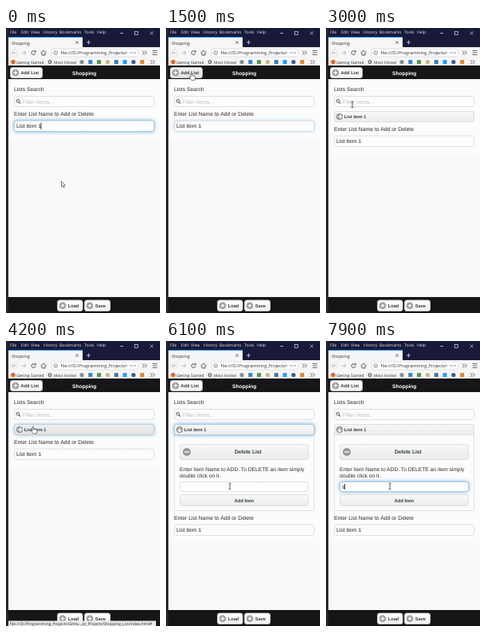
Recreate the animation shown at these times as an HTML page with a canvas. Size 193 by 357 pixels, loop 8000 ms.

```html
<!DOCTYPE html>
<html lang="en">
<head>
<meta charset="utf-8">
<title>Shopping</title>
<style>
html, body { margin: 0; width: 100%; height: 100%; overflow: hidden; background: #f9f8fa; }
canvas { display: block; width: 193px; height: 357px; }
</style>
</head>
<body>
<canvas id="stage" width="193" height="357"></canvas>
<script>
const LOOP = 8000, STEP = 100;
const ctx = document.getElementById('stage').getContext('2d');
ctx.textRendering = 'geometricPrecision';

const PAGE = '"Liberation Sans", Arial, sans-serif';
const CHROME = '"Open Sans", sans-serif';
const BAR = '#161618', CONTENT = '#fcfcfd', BACKDROP = '#f9f8fa';

// Pointer path: time, x, y, shape
const path = [
  [0, 69.5, 192, 'arrow'], [100, 74, 204, 'arrow'], [300, 106, 262, 'arrow'], [400, 111, 272, 'arrow'],
  [600, 88, 208, 'arrow'], [800, 58, 122, 'beam'], [900, 48.5, 90, 'beam'], [1000, 44, 78, 'arrow'],
  [1300, 32, 55, 'hand'], [1600, 30, 57, 'hand'], [2500, 30, 57, 'hand'], [2700, 31, 68, 'arrow'],
  [2900, 33, 88, 'beam'], [3100, 33, 104, 'hand'], [3300, 33, 107, 'hand'], [5100, 33, 107, 'hand'],
  [5300, 58, 121, 'arrow'], [5400, 76, 129, 'hand'], [5500, 86, 133, 'hand'], [5600, 92, 116, 'hand'],
  [5800, 101, 56, 'arrow'], [6000, 98, 138, 'arrow'], [6100, 80, 182, 'beam']
];

const between = (t, a, b) => t >= a && t < b;
const ramp = (t, a, b) => Math.max(0, Math.min(1, (t - a) / (b - a)));

function rect(x, y, w, h, fill) {
  ctx.fillStyle = fill;
  ctx.fillRect(x, y, w, h);
}

function text(str, x, y, size = 6.85, { color = '#2a2a2a', bold = false, align = 'left', font = PAGE } = {}) {
  ctx.font = `${bold ? 'bold ' : ''}${size}px ${font}`;
  ctx.textAlign = align;
  ctx.fillStyle = color;
  ctx.fillText(str, x, y);
}

function line(color, width, ...points) {
  ctx.beginPath();
  points.forEach(([x, y]) => ctx.lineTo(x, y));
  ctx.strokeStyle = color;
  ctx.lineWidth = width;
  ctx.stroke();
}

function disc(x, y, r, fill) {
  ctx.beginPath();
  ctx.arc(x, y, r, 0, 7);
  ctx.fillStyle = fill;
  ctx.fill();
}

function ring(x, y, r, color, width = 0.8, start = 0, end = 7) {
  ctx.beginPath();
  ctx.arc(x, y, r, start, end);
  ctx.strokeStyle = color;
  ctx.lineWidth = width;
  ctx.stroke();
}

function box(x, y, w, h, top, bottom = top, glow = 0, border = '#d8d8d8') {
  const shade = ctx.createLinearGradient(0, y, 0, y + h);
  shade.addColorStop(0, top);
  shade.addColorStop(1, bottom);
  ctx.save();
  ctx.beginPath();
  ctx.roundRect(x + 0.5, y + 0.5, w - 1, h - 1, 2.5);
  ctx.shadowColor = `rgba(51,136,204,${glow * 0.85})`;
  ctx.shadowBlur = glow ? 5 : 0;
  ctx.fillStyle = shade;
  ctx.fill();
  ctx.restore();
  ctx.strokeStyle = border;
  ctx.lineWidth = 0.8;
  ctx.stroke();
  if (glow) {
    ctx.strokeStyle = `rgba(110,180,225,${glow * 0.5})`;
    ctx.stroke();
  }
}

function icon(kind, x, y, r = 4.3) {
  disc(x, y, r, '#999');
  const s = r * 0.58, put = (...pts) => line('#fff', 1.3, ...pts.map(([a, b]) => [x + a * s, y + b * s]));
  if (kind !== 'down') put([-1, 0], [1, 0]);
  if (kind === 'plus' || kind === 'down') put([0, -1], [0, 1]);
  if (kind === 'right') put([0.1, -0.9], [1, 0], [0.1, 0.9]);
  if (kind === 'down') put([-0.9, 0.1], [0, 1], [0.9, 0.1]);
}

function button(x, y, w, h, label, { hover = false, glow = 0, kind, labelX, size = 5.7, light = false } = {}) {
  const [top, bottom] = hover ? ['#f0f0f0', '#e1e1e1'] : light ? ['#fff', '#f1f1f1'] : ['#f7f7f7', '#ececec'];
  box(x, y, w, h, top, bottom, glow);
  if (kind) icon(kind, x + (h > 17 ? 9 : 7), y + h / 2, h > 17 ? 5 : 4.3);
  const centered = labelX === undefined;
  text(label, centered ? x + w / 2 : labelX, y + h / 2 + size * 0.36, size,
    { bold: true, align: centered ? 'center' : 'left', color: '#2f3e46' });
}

function browser() {
  rect(0, 0, 193, 24, '#191a3a');
  const white = { color: '#e6e6ee', font: CHROME };
  [['File', 5], ['Edit', 19], ['View', 31], ['History', 47], ['Bookmarks', 67], ['Tools', 98], ['Help', 114]]
    .forEach(([label, x]) => text(label, x, 7.2, 5.2, white));
  line('#ddd', 0.7, [143, 6.5], [147, 6.5]);
  ctx.strokeRect(161.2, 4.5, 4, 4);
  line('#ddd', 0.7, [180.5, 4.5], [184.5, 8.5]);
  line('#ddd', 0.7, [184.5, 4.5], [180.5, 8.5]);

  rect(3, 12, 93, 12, '#f5f6f7');
  rect(3, 11, 93, 1, '#0a84ff');
  text('Shopping', 7, 20.5, 5.2, { font: CHROME });
  line('#555', 0.7, [87, 16], [91, 20]);
  line('#555', 0.7, [91, 16], [87, 20]);
  line('#ddd', 0.8, [101, 18], [106, 18]);
  line('#ddd', 0.8, [103.5, 15.5], [103.5, 20.5]);

  rect(0, 24, 193, 24, '#f5f6f7');
  const ink = '#4a4a4f', faded = '#b4b4b8';
  ring(10, 31, 4.5, '#dcdcde', 0.6);
  line(faded, 0.9, [12.7, 31], [7.5, 31]);
  line(faded, 0.9, [10, 28.5], [7.5, 31], [10, 33.5]);
  line(faded, 0.9, [20, 31], [25, 31]);
  line(faded, 0.9, [22.5, 28.5], [25, 31], [22.5, 33.5]);
  ring(34.5, 31, 2.5, ink, 0.9, 0.3, 5.5);
  line(ink, 0.9, [37.2, 27.7], [37.2, 30], [35, 30]);
  line(ink, 0.9, [43.5, 31], [47, 28], [50.5, 31]);
  line(ink, 0.9, [45, 31], [45, 34], [49, 34], [49, 31]);
  box(57, 25.5, 109, 11, '#fff');
  ring(62.2, 31, 2.3, '#666', 0.7);
  line('#666', 0.7, [62.2, 30.5], [62.2, 32.3]);
  ctx.save();
  ctx.beginPath();
  ctx.rect(67, 25, 85, 12);
  ctx.clip();
  text('file:///D:/Programming_Projects/GitHub', 68.5, 33, 5.5, { font: CHROME });
  ctx.restore();
  [156, 159, 162].forEach(x => disc(x, 31, 0.7, ink));
  [171, 174].forEach(x => line(ink, 0.8, [x, 28.5], [x + 2.3, 31], [x, 33.5]));
  [28.5, 31, 33.5].forEach(y => line(ink, 0.8, [183.5, y], [189.5, y]));

  disc(9, 42.5, 2.8, '#e0672a');
  text('Getting Started', 13, 44.5, 4.9, { font: CHROME });
  disc(55, 42.5, 2.5, '#77777b');
  disc(55, 42.5, 1, '#f5f6f7');
  text('Most Visited', 60, 44.5, 4.9, { font: CHROME });
  ['#8c8c90', '#3b82d0', '#4f9a55', '#c9b878', '#4a76a8', '#1da1f2', '#3b5998', '#e08a2e']
    .forEach((color, i) => i % 3 ? rect(92.5 + i * 10.8, 40, 5, 5, color) : disc(95 + i * 10.8, 42.5, 2.6, color));
  [181, 184].forEach(x => line(ink, 0.8, [x, 40], [x + 2.3, 42.5], [x, 45]));
}

function input(x, y, w, h, glow, value, caretX) {
  box(x, y, w, h, '#fafafa', '#fff', glow);
  text(value, x + 3, y + h / 2 + 2.7);
  if (caretX) line('#111', 0.8, [caretX, y + 3], [caretX, y + h - 3]);
}

function page(t) {
  const added = t >= 1800, open = t >= 4300;
  const shift = open ? 114 : added ? 19 : 0;
  rect(3, 64, 190, 75 + shift, CONTENT);
  rect(3, 47, 190, 17, BAR);
  button(5, 49, 41, 14, 'Add List', { light: true, kind: 'plus', labelX: 18.5, hover: between(t, 1300, 2700) });
  text('Shopping', 98.2, 59, 6.6, { bold: true, color: '#fff', align: 'center' });

  text('Lists Search', 10, 79);
  input(10, 85, 176, 14, 0, '');
  ring(15, 91.3, 1.8, '#555', 1);
  line('#555', 1.1, [16.3, 92.7], [18, 94.5]);
  text('Filter items...', 21, 94.7, 6.85, { color: '#c0c0c0' });

  if (open) box(10, 112, 176, 101, CONTENT, CONTENT);
  if (added) {
    button(10, 104, 176, 14, 'List item 1', {
      kind: open ? 'down' : 'right', labelX: 22.7, size: 5.6,
      hover: between(t, 3100, 5300),
      glow: ramp(t, 4000, 4300) * (1 - ramp(t, 6300, 6600))
    });
  }
  if (open) {
    button(17, 129, 162, 20, 'Delete List', { kind: 'minus', labelX: 86, size: 6.7, hover: between(t, 5400, 5700) });
    text('Enter item Name to ADD. To DELETE an item simply', 17, 162.5, 6.7);
    text('double click on it.', 17, 171, 6.7);
    const typed = t >= 7800;
    const caret = typed ? 23.5 : between(t, 6400, 6900) || t >= 7500 ? 20 : 0;
    input(17, 176, 162, 13, ramp(t, 6300, 6600), typed ? 's' : '', caret);
    button(17, 192, 162, 15, 'Add Item');
  }

  text('Enter List Name to Add or Delete', 10, 110 + shift);
  input(10, 115.5 + shift, 176, 14.5, 1 - ramp(t, 1300, 1600), 'List item 1', t < 200 ? 44 : 0);

  rect(3, 337, 190, 20, BAR);
  button(64, 340.5, 32.5, 14.5, 'Load', { light: true, kind: 'plus', labelX: 77.7 });
  button(98, 340.5, 33, 14.5, 'Save', { light: true, kind: 'plus', labelX: 111.7 });

  if (between(t, 3100, 5700)) {
    rect(3, 350.5, 185, 6.5, '#e9e9eb');
    text('file:///D:/Programming_Projects/GitHu…pt_Projects/Shopping_List/index.html#', 5, 355.5, 4.9, { font: CHROME });
  }
}

const outlines = {
  arrow: new Path2D('M0 0V7.6L1.8 6L3 8.8L4.2 8.2L3 5.6H5.4Z'),
  hand: new Path2D('M.2 .8Q1 -.6 1.8 .8V3.6L6 4.6Q7 5 6.6 7L5.8 10H1.4L-1.8 6.4Q-1.8 5 -.6 5.6L.2 6.4Z')
};

function pointer(t) {
  const i = path.findLastIndex(key => key[0] <= t);
  const a = path[i], b = path[i + 1] || a;
  const k = a === b ? 0 : (t - a[0]) / (b[0] - a[0]);
  const x = a[1] + (b[1] - a[1]) * k, y = a[2] + (b[2] - a[2]) * k;
  if (a[3] === 'beam') {
    line('#333', 0.8, [x, y - 3.7], [x, y + 3.7]);
    [-3.7, 3.7].forEach(d => line('#333', 0.6, [x - 1.6, y + d], [x + 1.6, y + d]));
    return;
  }
  ctx.save();
  ctx.translate(x, y);
  ctx.scale(0.9, 0.9);
  const shape = outlines[a[3]];
  ctx.fillStyle = '#fff';
  ctx.fill(shape);
  ctx.strokeStyle = '#333';
  ctx.lineWidth = 0.7;
  ctx.stroke(shape);
  ctx.restore();
}

function draw(now) {
  const t = Math.floor((now % LOOP) / STEP) * STEP;
  rect(0, 0, 193, 357, BACKDROP);
  browser();
  page(t);
  rect(0, 0, 3, 357, '#26262b');
  pointer(t);
}

const start = performance.now();
function tick() {
  draw(performance.now() - start);
  requestAnimationFrame(tick);
}
tick();
</script>
</body>
</html>
```
